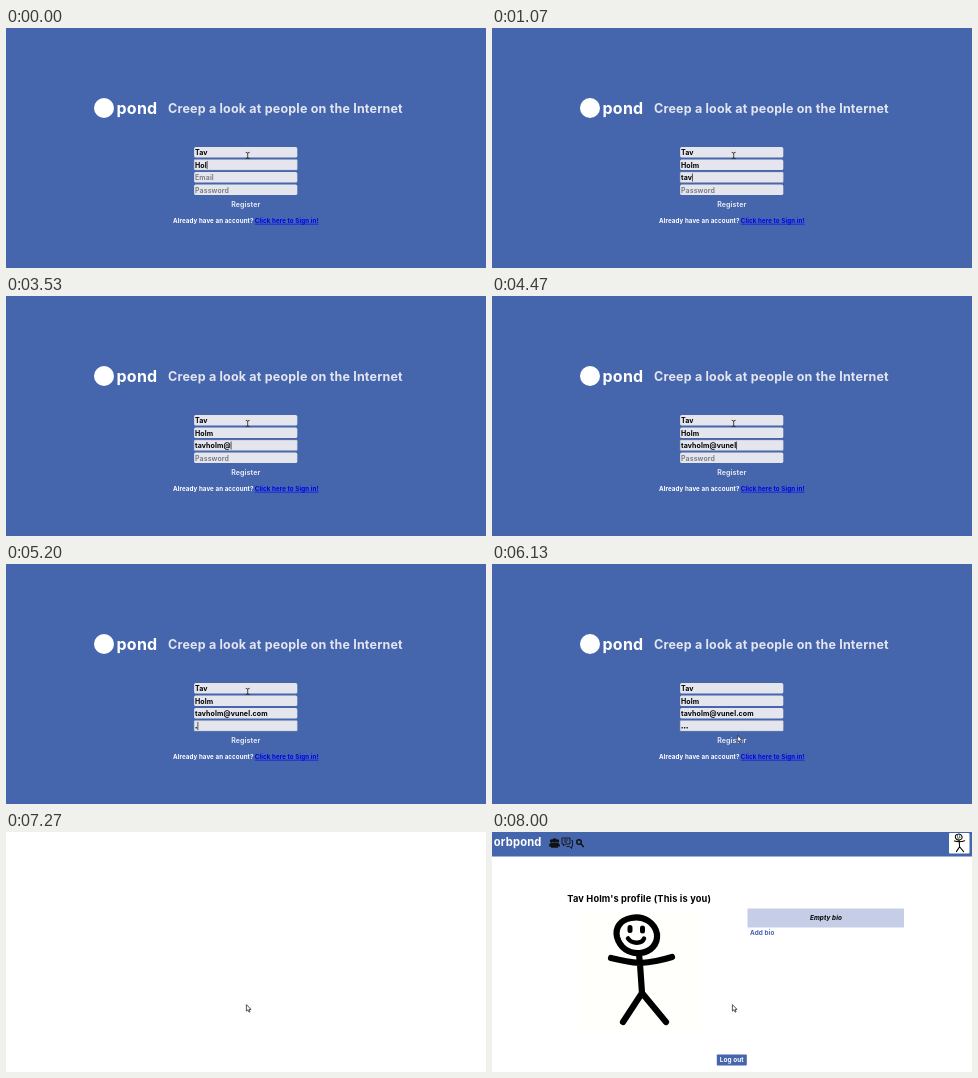
Write an HTML page that moves like this. It is 480x240 px and loops after 8.67 s.

```html
<!DOCTYPE html>
<html lang="en">
<head>
<meta charset="utf-8">
<title>Sign up</title>
<style>
  html, body { margin: 0; width: 100%; height: 100%; overflow: hidden; background: #fff; }
  svg { display: block; width: 480px; height: 240px; }
  text { font: 700 7px Inter, sans-serif; letter-spacing: .015em; white-space: pre; }
  .mid { text-anchor: middle; }
</style>
</head>
<body>
<svg viewBox="0 0 480 240">
  <defs>
    <g id="figure" fill="none" stroke="#000" stroke-width="6.2" stroke-linecap="round" stroke-linejoin="round">
      <path d="M139 86C128 88 123 96 125 105C128 116 137 122 148 121C159 120 166 112 165 102C163 91 152 83 139 86Z"/>
      <path d="M138 95.500v3M150.500 96v3" stroke-width="5"/>
      <path d="M136 106.500C140 112 150 112 152 106.500" stroke-width="4.500"/>
      <path d="M147 122L148 132L150 161L131 190M150 161L174 190M119 126Q135 130 148 131Q164 130 180 125"/>
    </g>
  </defs>

  <g id="login">
    <rect width="480" height="240" fill="#4565ad"/>
    <circle cx="98" cy="80" r="10" fill="#fff"/>
    <text x="110.500" y="85.500" fill="#fff" style="font-size:16px">pond</text>
    <text x="162" y="84.500" fill="#e3e5ef" style="font-size:12.5px">Creep a look at people on the Internet</text>
    <g id="fields"></g>
    <line id="caret" stroke="#111" stroke-width=".7"/>
    <rect id="outline" x="220.500" y="168.500" width="38.500" height="15" fill="none" stroke="#8289a6" stroke-width=".7" stroke-dasharray="1 .6"/>
    <text class="mid" x="239.800" y="178.600" fill="#e3e5ef">Register</text>
    <text x="167" y="194.800" fill="#fff" style="font-size:6.2px">Already have an account?</text>
    <text x="248.800" y="194.800" fill="#0000ee" text-decoration="underline" style="font-size:6.2px">Click here to Sign in!</text>
  </g>

  <g id="profile">
    <g id="header">
      <rect width="480" height="24.500" fill="#4565ad"/>
      <text x="1.800" y="14" fill="#fff" style="font-size:11.2px">orbpond</text>
      <g fill="#111">
        <circle cx="59.500" cy="9" r="1.700"/><circle cx="65.500" cy="9" r="1.700"/><circle cx="62.500" cy="8.500" r="2.300"/>
        <path d="M57 14.500q0-4 3-3.500h5q3-.5 3 3.500h-2v1.300h-7v-1.300z"/>
      </g>
      <g fill="none" stroke="#111" stroke-width=".9" stroke-linejoin="round">
        <path d="M70 6h8v6h-4.500l-2 2v-2h-1.500zM79.500 8.500h1v6h-1v2l-2-2h-3M72 8h4M72 10h3"/>
        <circle cx="87" cy="10" r="2.300" stroke-width="1.400"/>
        <path d="M88.800 11.800L91.800 15" stroke-width="1.400"/>
      </g>
      <rect x="457" y="1" width="20.500" height="20.500" rx="1" fill="#fffffb"/>
      <use href="#figure" transform="translate(457 1) scale(.168) translate(-87 -79)"/>
    </g>
    <g id="details">
      <text class="mid" x="147.200" y="70.300" style="font-size:9.25px">Tav Holm's profile (This is you)</text>
      <rect x="255.500" y="76.500" width="156.500" height="19" rx=".8" fill="#c5cee6"/>
      <text class="mid" x="334" y="88.400" style="font-size:6.4px;font-style:italic">Empty bio</text>
      <text x="258" y="102.700" fill="#4565ad" style="font-size:6.4px">Add bio</text>
      <rect x="224.800" y="222.500" width="30" height="11" rx=".8" fill="#4565ad"/>
      <text class="mid" x="239.800" y="230.300" fill="#fff" style="font-size:6.4px">Log out</text>
    </g>
    <g id="picture">
      <rect x="87" y="79" width="122" height="121" fill="#fffffb"/>
      <use href="#figure"/>
    </g>
  </g>

  <path id="beam" d="M-2-3.200Q0-3.200 0-2Q0-3.200 2-3.200M0-2.500V2.500M-2 3.200Q0 3.200 0 2Q0 3.200 2 3.200" fill="none" stroke="#222" stroke-width=".8"/>
  <path id="arrow" d="M0 0V6.500L1.500 5.200L2.600 7.600L3.700 7.100L2.600 4.800H4.600Z" fill="#fff" stroke="#111" stroke-width=".7" stroke-linejoin="round"/>
</svg>

<script>
const LOOP = 8670, LEFT = 189;
const $ = id => document.getElementById(id);
const show = (el, on) => { el.style.display = on ? '' : 'none'; };
const rowTop = i => 119 + 12.5 * i;

// Each field: its full value and the [time, typed length] steps.
const fields = [
  { value: 'Tav', hint: 'First name', keys: [[0, 3]] },
  { value: 'Holm', hint: 'Last name', keys: [[0, 3], [70, 4]] },
  { value: 'tavholm@vunel.com', hint: 'Email', keys: [
    [730, 1], [1070, 3], [2470, 4], [2800, 5], [2870, 6], [3130, 7], [3400, 8], [3730, 9], [3870, 10],
    [4070, 11], [4270, 12], [4400, 13], [4530, 14], [4600, 15], [4670, 16], [4800, 17]] },
  { value: '•••', hint: 'Password', size: 5, keys: [[5200, 1], [5470, 3]] }
];
const focusTimes = [[0, 1], [330, 2], [4930, 3], [6870, -1]];
const path = [[5930, 241.7, 127.5], [6270, 248, 196.5], [6600, 240.4, 172.6]];

function make(tag, attrs) {
  const el = document.createElementNS('http://www.w3.org/2000/svg', tag);
  for (const name in attrs) el.setAttribute(name, attrs[name]);
  return $('fields').appendChild(el);
}

fields.forEach((field, i) => {
  const y = rowTop(i);
  field.box = make('rect', { x: 188.1, y: y + .1, width: 103.2, height: 10.5, fill: '#e4e5ed', 'stroke-width': .4 });
  field.label = make('text', { x: LEFT, y: y + 8 });
});

const latest = (steps, t) => steps.filter(step => step[0] <= t).pop();

function pointer(t) {
  const next = path.findIndex(p => p[0] > t);
  if (next <= 0) return path[next < 0 ? path.length - 1 : 0].slice(1);
  const a = path[next - 1], b = path[next];
  const u = (t - a[0]) / (b[0] - a[0]), ease = u * u * (3 - 2 * u);
  return [1, 2].map(k => a[k] + (b[k] - a[k]) * ease);
}

function drawFields(t) {
  const [since, focus] = latest(focusTimes, t);
  fields.forEach((field, i) => {
    const key = latest(field.keys, t), { box, label } = field;
    label.textContent = key ? field.value.slice(0, key[1]) : field.hint;
    label.setAttribute('fill', key ? '#000' : '#75767c');
    label.style.fontWeight = key ? 700 : 600;
    label.style.fontSize = (key && field.size || 7) + 'px';
    box.setAttribute('rx', i === focus ? .8 : 1.6);
    box.setAttribute('stroke', i === focus ? '#a3a5b0' : 'none');
  });

  const field = fields[focus];
  const key = field && latest(field.keys, t);
  const idle = t - Math.max(since, key ? key[0] : 0);
  show($('caret'), field && idle % 1130 < 530);
  if (!field) return;
  const x = LEFT + .4 + (key ? field.label.getComputedTextLength() : 0), y = rowTop(focus);
  $('caret').setAttribute('x1', x);
  $('caret').setAttribute('x2', x);
  $('caret').setAttribute('y1', y + 1.5);
  $('caret').setAttribute('y2', y + 9.5);
}

function draw(t) {
  const loggedIn = t >= 7270;
  show($('login'), !loggedIn);
  show($('profile'), loggedIn);
  show($('header'), t >= 7400);
  show($('details'), t >= 7530);
  show($('picture'), t >= 7600);
  show($('outline'), t >= 6870);
  if (!loggedIn) drawFields(t);

  const [x, y] = pointer(t), overField = y < rowTop(4) - 1;
  show($('beam'), overField);
  show($('arrow'), !overField);
  for (const id of ['beam', 'arrow']) $(id).setAttribute('transform', `translate(${x} ${y})`);
}

const start = performance.now();
function tick() {
  draw((performance.now() - start) % LOOP);
  requestAnimationFrame(tick);
}
tick();
</script>
</body>
</html>
```
